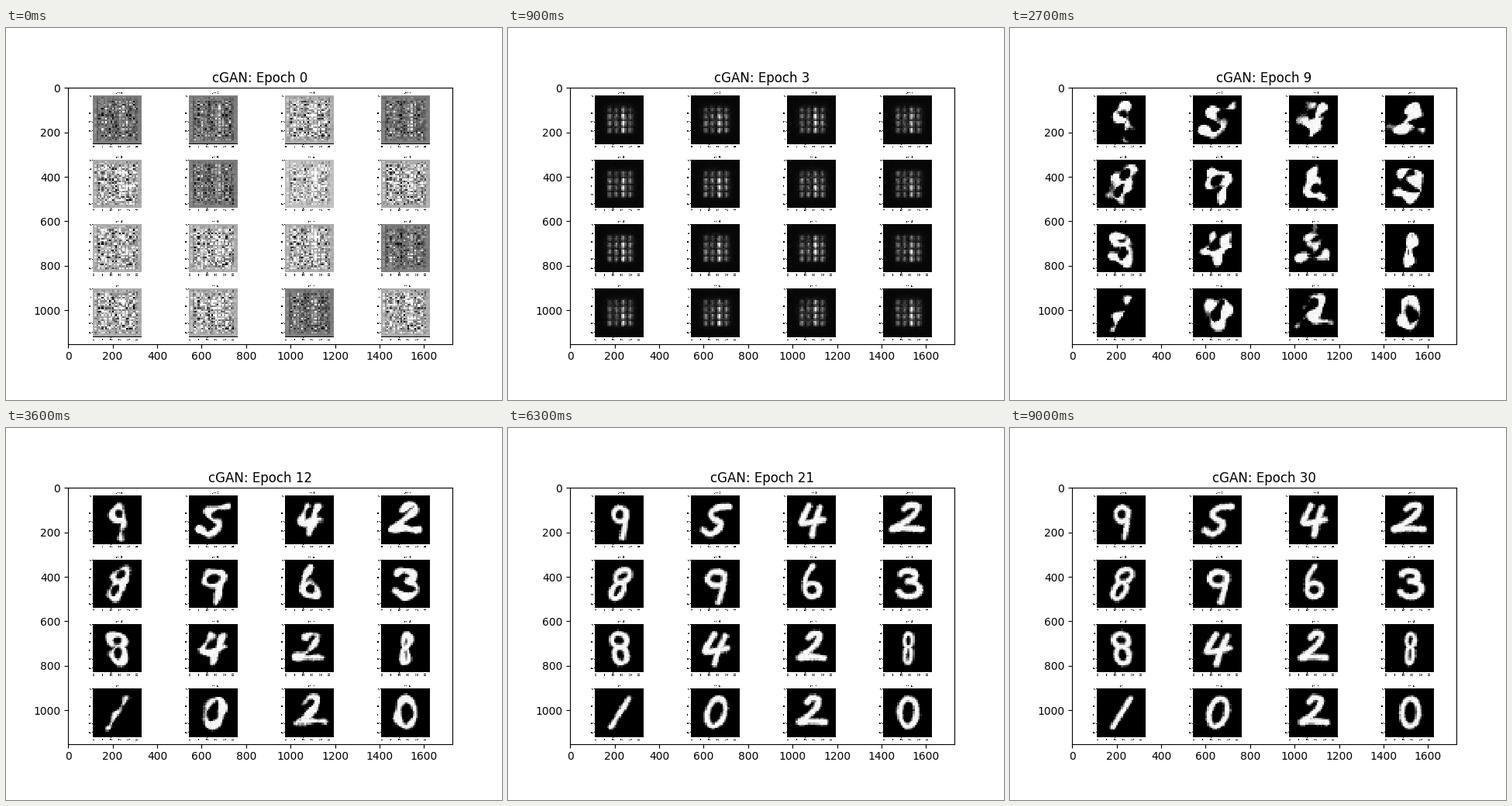
These frames come from a looping animation (640x480 px, 9.3 s). A matplotlib script:

```python
import numpy as np
import matplotlib.pyplot as plt
from matplotlib.animation import FuncAnimation
from matplotlib.path import Path
from matplotlib.textpath import TextPath

EPOCHS = 31
N = 28
W, H = 1728, 1152
LEFT, TOP, SIDE = 112, 34, 218
STEP_X, STEP_Y = 432, 288.67
CENTER = 14.4

# Digit, half width and slant of each sample, row by row
TILES = [
    (9, 3.7, 0.0), (5, 7.0, 0.1), (4, 6.0, 0.0), (2, 8.5, 0.15),
    (8, 4.0, 0.35), (9, 5.0, 0.05), (6, 4.3, 0.0), (3, 6.3, -0.05),
    (8, 4.4, -0.1), (4, 6.2, 0.1), (2, 7.0, 0.1), (8, 2.2, 0.05),
    (1, 4.0, 0.63), (0, 5.0, 0.2), (2, 7.3, 0.0), (0, 4.9, 0.02),
]
DARK = {0, 1, 3, 5, 11, 14}

gy, gx = np.mgrid[0:N, 0:N] + 0.5


def arc(cy, rx, ry, start=0, end=360):
    a = np.radians(np.linspace(start, end, 40))
    return np.column_stack([rx * np.cos(a), cy + ry * np.sin(a)])


def path(*flat, steps=8):
    """Catmull-Rom samples through the points x, y, x, y, ..."""
    p = np.reshape(flat, (-1, 2)).astype(float)
    p = np.vstack([2 * p[0] - p[1], p, 2 * p[-1] - p[-2]])
    t = np.linspace(0, 1, steps)[:, None]
    return np.vstack([
        b + 0.5 * t * (c - a + t * (2 * a - 5 * b + 4 * c - d
                                    + t * (3 * (b - c) + d - a)))
        for a, b, c, d in zip(p, p[1:], p[2:], p[3:])])


# x runs from -1 to 1 across the digit, y is in grid rows
GLYPHS = {
    0: [arc(14, 1, 8)],
    1: [path(0, 6, 0, 14, 0, 22.5)],
    2: [path(-0.4, 8, 0, 5.5, 0.5, 6.5, 0.35, 11, -0.3, 16, -1, 19.5,
             -0.2, 19, 1, 19.5)],
    3: [arc(9.5, 0.75, 3, -160, 90), arc(17, 1, 4.5, -90, 160)],
    4: [path(-0.3, 6, -0.8, 12, -1, 16, 0, 15.5, 1, 14),
        path(0.75, 7, 0.3, 15, 0, 23)],
    5: [path(1, 6.5, 0.1, 7, -0.5, 10, -0.3, 13, 0.4, 16, 0.2, 20.5,
             -0.4, 22.5, -1, 20)],
    6: [path(0.1, 4, -0.8, 10, -1, 17), arc(17.5, 1, 4)],
    8: [arc(9.5, 1, 3.8), arc(18, 0.85, 4.7)],
    9: [arc(11, 1, 4), path(1, 9, 0.8, 16, 0.4, 24.5)],
}


def ripple(rng, epoch):
    """Smooth field in about -1..1 that drifts with training."""
    p = rng.uniform(0, 2 * np.pi, 2) + 0.25 * epoch
    return 0.6 * (np.sin(0.5 * gx + 0.2 * gy + p[0])
                  + np.sin(0.5 * gy - 0.2 * gx + p[1]))


def digit(tile, epoch):
    """A brushed digit, warped and broken into blobs early in training."""
    num, half, slant = TILES[tile]
    pts = np.vstack(GLYPHS[num])
    px = CENTER + half * pts[:, 0] + slant * (14 - pts[:, 1])
    rng = np.random.default_rng(100 + tile)
    rough = np.exp((7 - epoch) / 3.5)
    x = gx + 2.2 * rough * ripple(rng, epoch)
    y = gy + 2.2 * rough * ripple(rng, epoch)
    d = np.hypot(x[..., None] - px, y[..., None] - pts[:, 1]).min(axis=2)
    d += (3 * rough + 0.15) * ripple(rng, epoch) - min(0.95 + 0.14 * half, 1.75)
    grain = np.random.default_rng(1000 + 100 * tile + epoch)
    d += grain.normal(0, 0.12, (N, N))
    return np.clip(0.5 - d / 1.2, 0, 1) * grain.uniform(0.94, 1, (N, N))


shared = np.random.default_rng(5).normal(size=(N, N))
bias = np.random.default_rng(6).normal(size=N) * 0.06
weave = (np.where(gx.astype(int) % 2, 1, 0.4)
         * np.where(gy.astype(int) % 2, 1, 0.45))
rim = np.clip(np.minimum.reduce([gx, gy, N - gx, N - gy]) / 4 - 0.1, 0.05, 1)


def static(tile):
    """Untrained output: woven noise on a flat grey."""
    own = np.random.default_rng(40 + tile).normal(size=(N, N))
    base, amp = (0.5, 0.24) if tile in DARK else (0.67, 0.45)
    if tile == 6:
        base, amp = 0.75, 0.32
    shift = -0.08 if tile in DARK else 0
    return np.clip(base + rim * (amp * weave * (0.8 * shared + 0.8 * own)
                                 + shift + bias), 0, 1)


def lattice(tile):
    """Early output: a 4 x 4 grid of glowing dots."""
    rng = np.random.default_rng(80 + tile)
    glow = np.exp(-((gx - 14.5) / 8) ** 4 - ((gy - 14) / 8) ** 4)
    img = 0.03 + 0.13 * glow * rng.uniform(0.2, 1.4, (N, N))
    for i, bright in enumerate((0.45, 0.4, 1, 0.5)):
        for j in range(4):
            dx, dy = gx - 8.4 - 4 * i, gy - 8.2 - 4 * j
            dot = np.exp(-(dx / 1.05) ** 4 - (dy / 1.5) ** 4)
            img += bright * (0.9 if j else 0.55) * rng.uniform(0.7, 1.15) * dot
    return np.clip(img * rng.uniform(0.75, 1.1, (N, N)), 0, 1)


def sample(tile, epoch):
    if epoch >= 7:
        return digit(tile, epoch)
    if epoch <= 3:
        f = 1 - (1 - epoch / 3) ** 2
        return (1 - f) * static(tile) + f * lattice(tile)
    f = (epoch - 3) / 4
    return (1 - f) * lattice(tile) + f * digit(tile, 7)


# A large sheet of small plots, shown reduced without smoothing
sheet = np.ones((H, W), dtype=np.float32)
cell = np.arange(SIDE) * N // SIDE


def corner(tile):
    row, col = divmod(tile, 4)
    return LEFT + col * STEP_X, int(TOP + row * STEP_Y)


def stamp(text, size, x, y, align):
    """Set black text on the sheet; align 0.5 centres it, 1 ends it at x."""
    outline = TextPath((0, 0), text, size=size)
    box = outline.get_extents()
    x -= box.x0 + align * box.width
    rows, cols = np.mgrid[int(y - box.y1) - 1:int(y - box.y0) + 2,
                          int(x + box.x0) - 1:int(x + box.x1) + 2]
    pts = np.column_stack([cols.ravel() + 0.5 - x, y - rows.ravel() - 0.5])
    ink = np.zeros(len(pts), dtype=bool)
    for poly in outline.to_polygons():
        ink ^= Path(poly).contains_points(pts)
    sheet[rows.ravel()[ink], cols.ravel()[ink]] = 0


def frame(tile):
    x, y = corner(tile)
    right, low = x + SIDE, y + SIDE
    sheet[[y, low], x:right + 1] = 0
    sheet[y:low + 1, [x, right]] = 0
    stamp(f"Label: {TILES[tile][0]}", 12, x + SIDE / 2, y - 6, 0.5)
    for v in range(0, N, 5):
        at = int((v + 0.5) * SIDE / N)
        sheet[low:low + 5, x + at] = 0
        sheet[y + at, x - 4:x] = 0
        stamp(str(v), 10, x + at, low + 15, 0.5)
        stamp(str(v), 10, x - 8, y + at + 4, 1)


for k in range(len(TILES)):
    frame(k)

fig, ax = plt.subplots(figsize=(6.4, 4.8), dpi=100)
image = ax.imshow(sheet, cmap="gray", vmin=0, vmax=1, interpolation="nearest")
title = ax.set_title("cGAN: Epoch 0", pad=5.3)


def update(epoch):
    for k in range(len(TILES)):
        x, y = corner(k)
        pixels = sample(k, epoch)[np.ix_(cell, cell)]
        sheet[y + 1:y + SIDE, x + 1:x + SIDE] = pixels[1:, 1:]
    image.set_data(sheet)
    title.set_text(f"cGAN: Epoch {epoch}")
    return [image, title]


anim = FuncAnimation(fig, update, frames=EPOCHS, interval=300, repeat=True)
plt.show()
```
